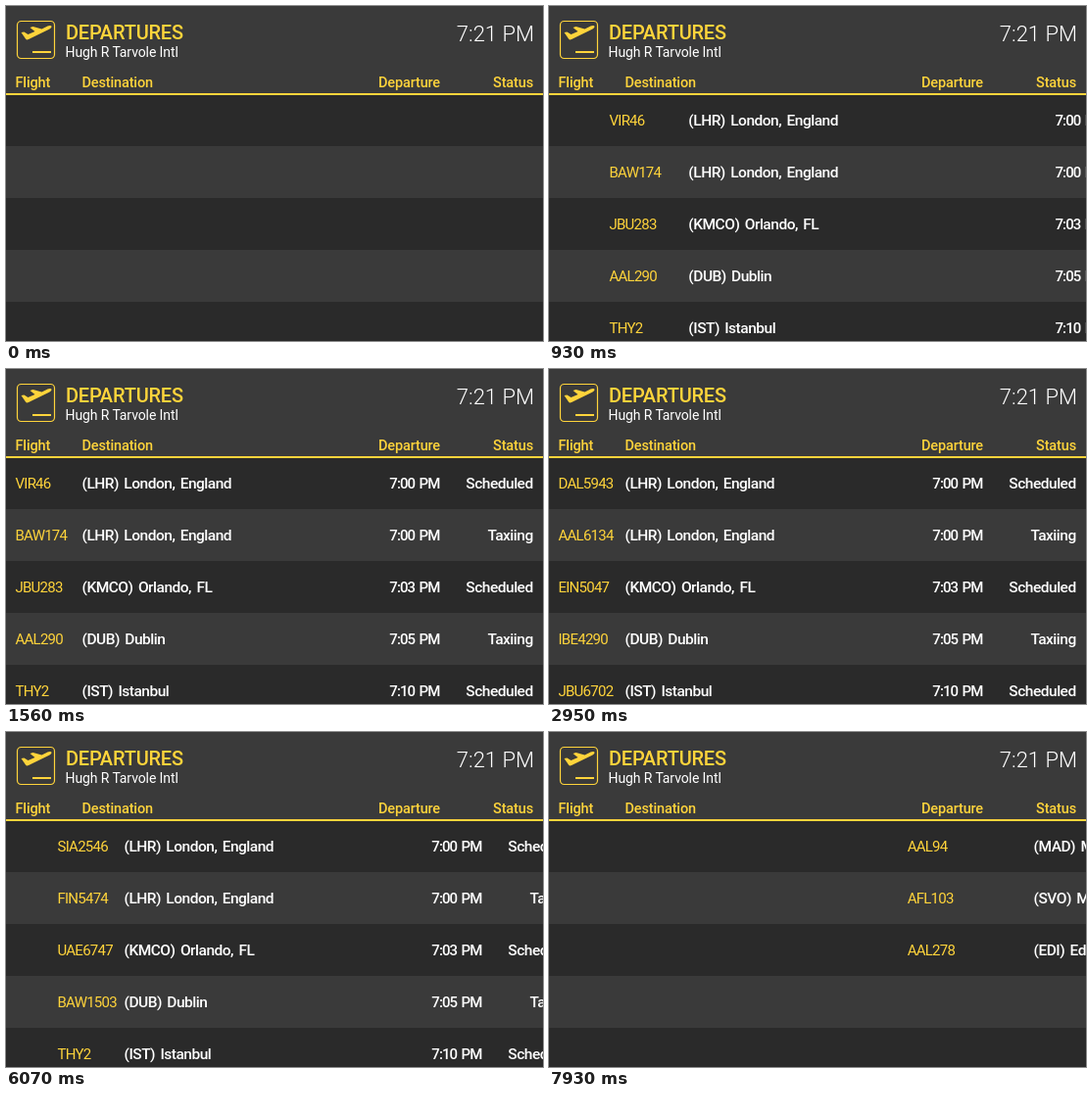
Write an HTML page that moves like this. It is 548x342 px and loops after 8000 ms.

```html
<!DOCTYPE html>
<html lang="en">
<head>
<meta charset="utf-8">
<title>Departures board</title>
<style>
  html, body { margin: 0; width: 100%; height: 100%; overflow: hidden; background: #3a3a3a; }
  svg { display: block; width: 548px; height: 342px; font-family: Roboto, Arial, sans-serif; }
  text { white-space: pre; }
  .gold { fill: #ffd43b; }
  .white { fill: #fff; }
  .title { font-size: 20px; font-weight: 500; letter-spacing: -.2px; }
  .place { font-size: 14px; letter-spacing: -.1px; }
  .clock { font-size: 22px; font-weight: 300; }
  .head { font-size: 14.5px; font-weight: 500; letter-spacing: -.15px; }
  .end { text-anchor: end; }
  #rows text { font-size: 15.5px; font-weight: 500; fill: #fff; }
  #rows .flight { font-size: 15px; font-weight: 400; fill: #ffd43b; letter-spacing: -.75px; }
  #rows .dest { letter-spacing: -.5px; word-spacing: 2px; }
  #rows .time { font-size: 15px; letter-spacing: -.9px; word-spacing: 1.5px; }
  #rows .status { letter-spacing: -.5px; }
</style>
</head>
<body>
<svg viewBox="0 0 548 342">
  <rect width="548" height="342" fill="#3a3a3a"/>
  <path d="M0 91h548v52H0zM0 196h548v53H0zM0 302h548v40H0z" fill="#2a2a2a"/>
  <rect class="gold" y="89" width="548" height="2"/>

  <rect x="11.5" y="15.5" width="38" height="38" rx="4" fill="none" stroke="#ffd43b" stroke-width="1.2"/>
  <path class="gold" d="M15.5 27l3-.5 4 2.5 7-3-5-4 3-1 9 2.5 6-3c2-1 4-.5 4 .5s-1 2-3 3L23 34q-2 1-3-.5z"/>
  <path d="M27 47h19" stroke="#ffd43b" stroke-width="2"/>

  <text class="gold title" x="61" y="34">DEPARTURES</text>
  <text class="white place" x="60.5" y="52">Hugh R Tarvole Intl</text>
  <text class="white clock end" x="539" y="36">7:21 PM</text>

  <text class="gold head" x="9.5" y="83">Flight</text>
  <text class="gold head" x="77.5" y="83">Destination</text>
  <text class="gold head end" x="443" y="83">Departure</text>
  <text class="gold head end" x="538" y="83">Status</text>
  <g id="rows"></g>
</svg>
<script>
const LOOP = 8000, STEP = 155.5;
const columns = [
  { name: 'flight', x: 9.5, spread: 0 },
  { name: 'dest', x: 77.5, spread: 1 },
  { name: 'time end', x: 442.5, spread: 5.7 },
  { name: 'status end', x: 537.7, spread: 7.2 }
];

// Each row: flight codes shown in turn, destination, time, status
const firstPage = [
  ['VIR46 DAL5943 SIA2546', '(LHR) London, England', '7:00 PM', 'Scheduled'],
  ['BAW174 AAL6134 FIN5474', '(LHR) London, England', '7:00 PM', 'Taxiing'],
  ['JBU283 EIN5047 UAE6747', '(KMCO) Orlando, FL', '7:03 PM', 'Scheduled'],
  ['AAL290 IBE4290 BAW1503', '(DUB) Dublin', '7:05 PM', 'Taxiing'],
  ['THY2 JBU6702 THY2', '(IST) Istanbul', '7:10 PM', 'Scheduled']
];
const secondPage = [
  ['AAL94', '(MAD) Madrid, Spain', '7:15 PM', 'Scheduled'],
  ['AFL103', '(SVO) Moscow', '7:20 PM', 'Scheduled'],
  ['AAL278', '(EDI) Edinburgh', '7:25 PM', 'Scheduled']
];

// Horizontal offsets, one per step
const enter = [600, 408, 216, 104, 52, 22, 5, .5, 0];
const leave = [0, 43, 164, 288, 394, 458, 501, 533, 560];

function along(points, at) {
  const p = Math.max(0, Math.min(points.length - 1, at));
  const i = Math.floor(p), next = points[Math.min(i + 1, points.length - 1)];
  return points[i] + (next - points[i]) * (p - i);
}

const rows = document.getElementById('rows');
const cells = firstPage.map((_, r) => columns.map(col => {
  const cell = document.createElementNS('http://www.w3.org/2000/svg', 'text');
  cell.setAttribute('class', col.name);
  cell.setAttribute('y', 122 + 53 * r);
  return rows.appendChild(cell);
}));

function draw(step) {
  const second = step >= 47;
  const page = second ? secondPage : firstPage;
  const code = second || step < 19 ? 0 : step < 30 ? 1 : 2;
  const entry = along(enter, step - (second ? 49.73 : 2));
  const exit = second ? 0 : along(leave, step - 38);
  // The table is wider while it slides in
  const widen = entry * (.26 - .00025 * entry);

  cells.forEach((line, r) => line.forEach((cell, c) => {
    const value = page[r] ? page[r][c] : '';
    const text = c || !value ? value : value.split(' ')[code];
    if (cell.textContent !== text) cell.textContent = text;
    cell.setAttribute('x', columns[c].x + entry + exit + widen * columns[c].spread);
  }));
}

// The board refreshes in discrete steps
function tick() {
  draw(Math.floor((performance.now() % LOOP + 8) / STEP));
  requestAnimationFrame(tick);
}
tick();
</script>
</body>
</html>
```
